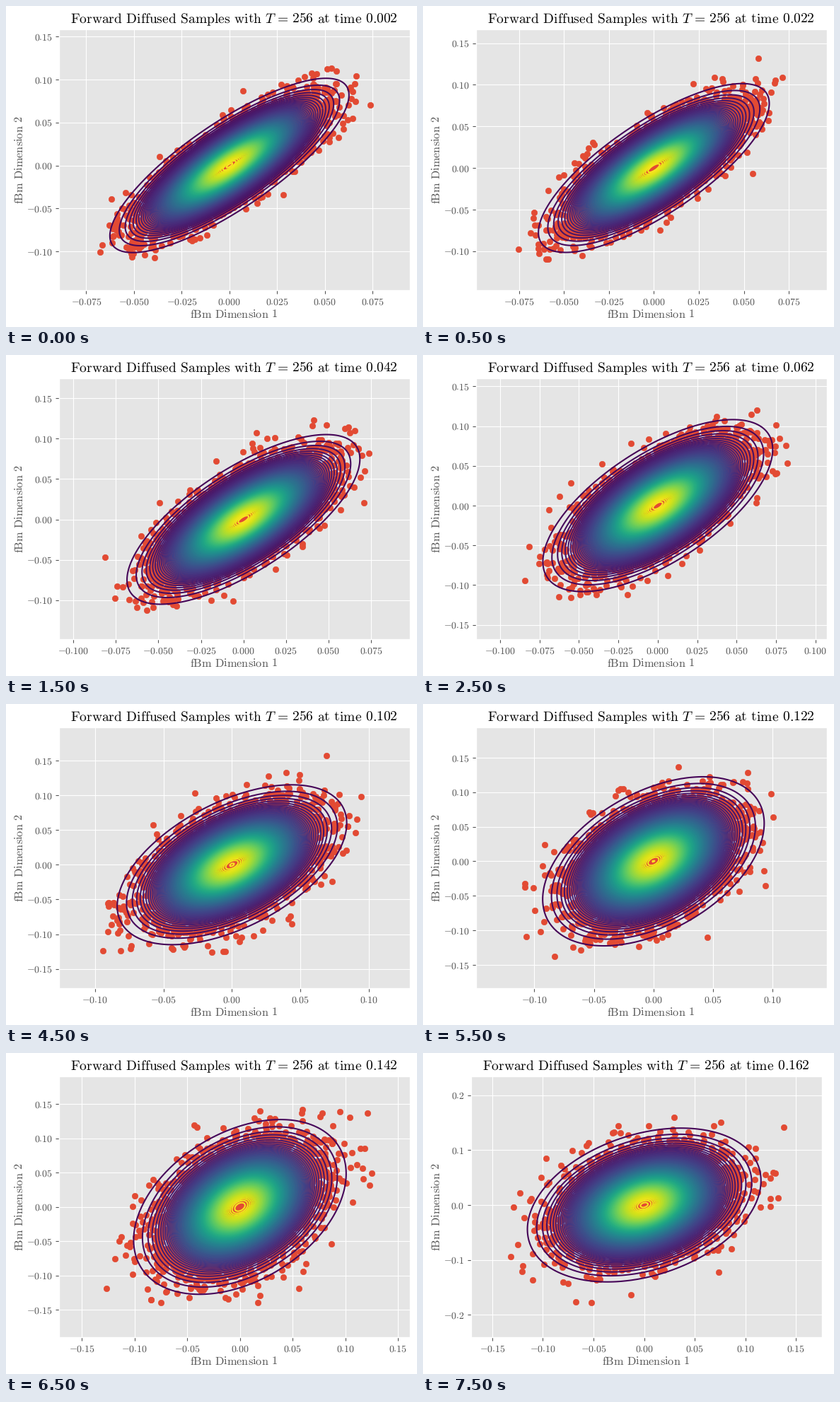
Recreate the animation shown at these times as a matplotlib script. Size 581 by 454 pixels, loop 8 s.

```python
import math

import numpy as np
import matplotlib.pyplot as plt
from matplotlib.animation import FuncAnimation

plt.style.use("ggplot")
plt.rcParams["mathtext.fontset"] = "cm"
plt.rcParams["text.hinting"] = "none"

W, H, DPI = 581, 454, 100
AX_W, AX_H, AX_TOP = 496, 369.6, 32.7
STEPS, HURST, N_POINTS = 256, 0.7, 6000
VIEW_MARGIN = 0.109  # share of the view left free on each side of the samples

# Views (x low, x high, y low, y high) at key steps, interpolated between.
VIEWS = {
    0: (-0.0891, 0.0947, -0.1456, 0.1588),
    2: (-0.1082, 0.0980, -0.1487, 0.1750),
    3: (-0.1150, 0.1074, -0.1683, 0.1603),
    5: (-0.1260, 0.1301, -0.1780, 0.1980),
    7: (-0.1713, 0.1616, -0.1903, 0.1907),
    8: (-0.1706, 0.1758, -0.2414, 0.2349),
}


def view(k):
    x0, x1, y0, y1 = (np.interp(k, list(VIEWS), side)
                      for side in zip(*VIEWS.values()))
    return (x0, x1), (y0, y1)


def roman(text):
    """Upright Computer Modern text with full word spaces."""
    return r"\mathrm{%s}" % text.replace(" ", r"\hspace{0.38}")


def covariance(t):
    """First two fractional Brownian motion values plus diffusion noise."""
    p = 2 * HURST
    cov = np.array([[1, 2 ** p / 2], [2 ** p / 2, 2 ** p]]) / STEPS ** p
    return cov + np.eye(2) * 1e-4 * (math.exp(15 * t) - 1)


def samples(cov, k, xlim, ylim):
    """Gaussian samples that stay clear of the edges of the view."""
    rng = np.random.default_rng(20 + k)
    pts = rng.multivariate_normal([0, 0], cov, N_POINTS)
    low, high = np.transpose([xlim, ylim])
    pad = VIEW_MARGIN * (high - low)
    return pts[np.all((pts > low + pad) & (pts < high - pad), axis=1)]


def density(cov, gx, gy):
    inv = np.linalg.inv(cov)
    q = inv[0, 0] * gx ** 2 + 2 * inv[0, 1] * gx * gy + inv[1, 1] * gy ** 2
    return np.exp(-q / 2) / (2 * math.pi * math.sqrt(np.linalg.det(cov)))


def ticks(lo, hi):
    """Round tick places, at most nine intervals, and their labels."""
    step, digits = next((s, d) for s, d in ((0.025, 3), (0.05, 2), (0.1, 1))
                        if (hi - lo) / s <= 9)
    places = np.arange(math.ceil(lo / step), math.floor(hi / step) + 1) * step
    return places, [f"${v:.{digits}f}$" for v in places]


fig = plt.figure(figsize=(W / DPI + 1e-9, H / DPI + 1e-9), dpi=DPI)
ax = fig.add_axes([0, 0, 1, 1])
label = dict(size=11.7, color="#555555", ha="center", va="baseline",
             rotation_mode="anchor")
x_label = fig.text(0, 1 - 441.2 / H, f"${roman('fBm Dimension 1')}$", **label)
fig.text(23.5 / W, 1 - 217.5 / H, f"${roman('fBm Dimension 2')}$",
         rotation=90, **label)


def draw(i):
    k = (i + 1) // 2
    t = 0.002 + 0.02 * k
    xlim, ylim = view(k)
    cov = covariance(t)
    y_places, y_labels = ticks(*ylim)

    # The axes start right of the widest y label.
    left = 26.4 + 7 * len(y_labels[0])
    ax.clear()
    ax.set_position([left / W, 1 - (AX_TOP + AX_H) / H, AX_W / W, AX_H / H])
    x_label.set_x((left + AX_W / 2 - 0.8) / W)

    ax.scatter(*samples(cov, k, xlim, ylim).T, color="#E24A33")
    gx, gy = np.meshgrid(np.linspace(*xlim, 200), np.linspace(*ylim, 200))
    ax.contour(gx, gy, density(cov, gx, gy), levels=100, cmap="viridis")

    ax.set_xticks(*ticks(*xlim))
    ax.set_yticks(y_places, y_labels)
    ax.set_xlim(*xlim)
    ax.set_ylim(*ylim)
    steps = rf"\hspace{{0.38}}T\hspace{{0.115}}=\hspace{{0.115}}{STEPS}"
    ax.set_title("$" + roman("Forward Diffused Samples with") + steps
                 + roman(f" at time {t:.3f}") + "$", size=14.05, x=0.4975)
    return []


anim = FuncAnimation(fig, draw, frames=16, interval=500, repeat=True,
                     blit=False)
plt.show()
```
